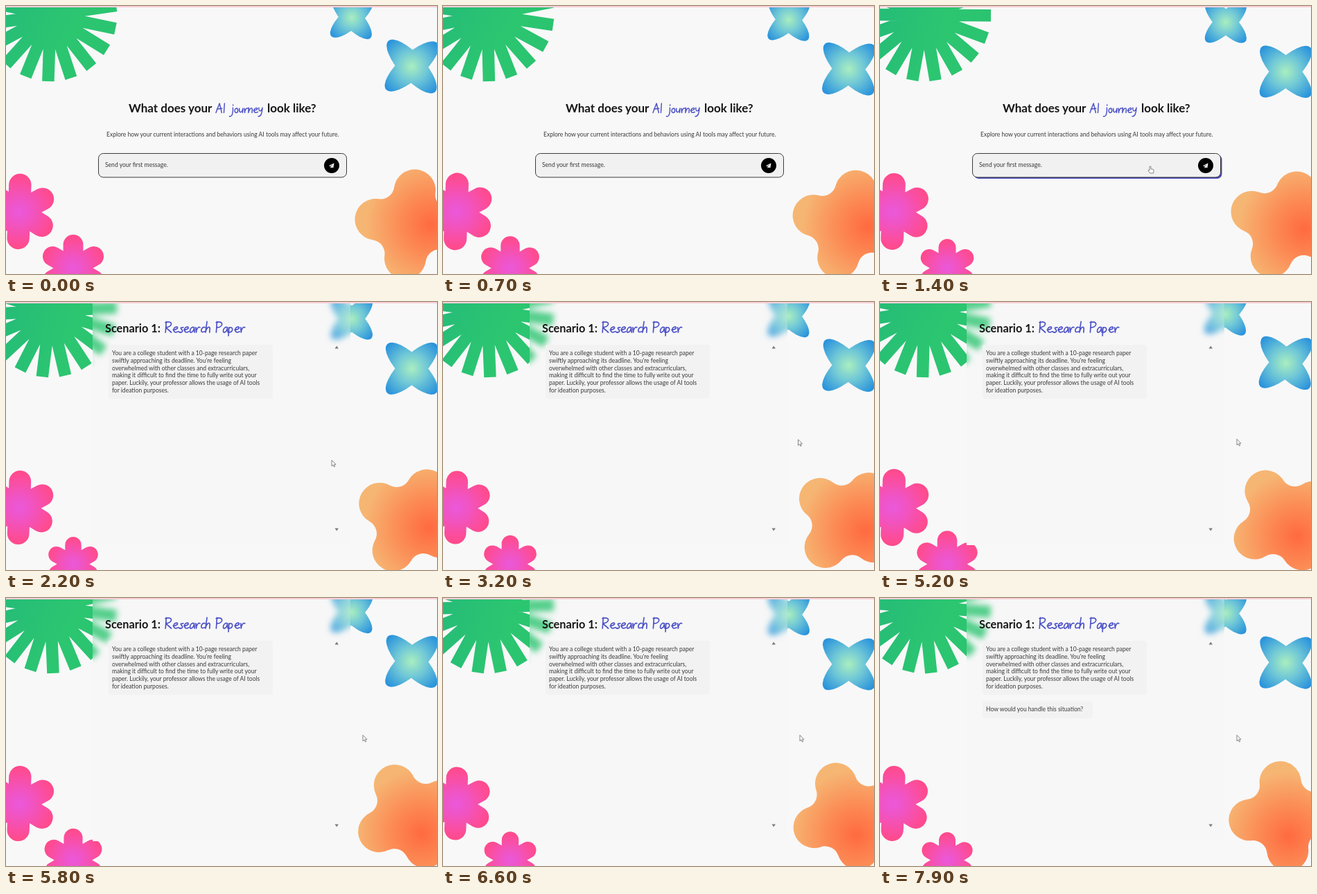
An HTML page for the animation above (8 s loop, 622 px wide and 388 px high).

```html
<!DOCTYPE html>
<html lang="en">
<head>
<meta charset="utf-8">
<title>AI journey</title>
<style>
html, body { margin: 0; width: 100%; height: 100%; overflow: hidden; background: #f8f8f8; }
svg { display: block; width: 622px; height: 388px; }
text { font: 8.55px Lato, "Open Sans", sans-serif; fill: #3a3a3a; }
.title { font-weight: 700; font-size: 17px; fill: #161616; }
.hand { fill: none; stroke: #4c51c6; stroke-width: 1.4; stroke-linecap: round; stroke-linejoin: round; }
</style>
</head>
<body>
<svg viewBox="0 0 622 388">
  <defs>
    <linearGradient id="greenFill" gradientUnits="userSpaceOnUse" x1="-60" y1="0" x2="70" y2="70">
      <stop stop-color="#26bd76"/><stop offset=".6" stop-color="#2cc671"/><stop offset="1" stop-color="#2ac36f"/>
    </linearGradient>
    <radialGradient id="blueFill" gradientUnits="userSpaceOnUse" cx="0" cy="0" r="48">
      <stop stop-color="#a9eebf"/><stop offset=".45" stop-color="#72c9d6"/><stop offset="1" stop-color="#2a93dc"/>
    </radialGradient>
    <radialGradient id="pinkFill" gradientUnits="userSpaceOnUse" cx="0" cy="0" r="50">
      <stop stop-color="#ea58da"/><stop offset=".35" stop-color="#f054c4"/><stop offset="1" stop-color="#ff4b8e"/>
    </radialGradient>
    <radialGradient id="orangeFill" gradientUnits="userSpaceOnUse" cx="30" cy="-4" r="95">
      <stop stop-color="#ff6a40"/><stop offset=".45" stop-color="#fc8a55"/><stop offset="1" stop-color="#f6b673"/>
    </radialGradient>
    <filter id="blur" x="-20%" y="-20%" width="140%" height="140%"><feGaussianBlur stdDeviation="4"/></filter>
    <clipPath id="panelClip"><rect x="125" y="2" width="372" height="350"/></clipPath>
    <g id="star" fill="url(#blueFill)">
      <ellipse rx="50" ry="18" transform="rotate(45)"/><ellipse rx="50" ry="18" transform="rotate(-45)"/>
    </g>
    <path id="flower" d="M0-38V38M-32.9-19L32.9 19M-32.9 19L32.9-19"
      stroke="url(#pinkFill)" stroke-width="32" stroke-linecap="round"/>
  </defs>

  <rect width="622" height="388" fill="#f8f8f8"/>
  <g id="burst"><path id="rays" stroke="url(#greenFill)" stroke-width="17.5"/></g>
  <use id="starTop" href="#star"/>
  <use id="starSide" href="#star"/>
  <use id="flowerA" href="#flower"/>
  <use id="flowerB" href="#flower"/>
  <path id="clover" fill="url(#orangeFill)"/>

  <g id="intro">
    <text class="title" x="177" y="154">What does your</text>
    <g class="hand" data-text="AI journey" data-at="303 154.5 1.04"></g>
    <text class="title" x="377" y="154">look like?</text>
    <text x="145" y="189">Explore how your current interactions and behaviors using AI tools may affect your future.</text>
    <rect id="shadow" x="135.5" y="215.5" width="358" height="34.5" rx="7" fill="#4b48b8"/>
    <rect x="133.5" y="213.5" width="358" height="34.5" rx="7" fill="#f1f1f1" stroke="#3a3a3a"/>
    <text x="143" y="233">Send your first message.</text>
    <circle cx="470" cy="231" r="11" fill="#000"/>
    <path d="M466 231.2L473.5 227.5 472.3 234.6 470 233.4 468.8 235 468.3 232.5 472 229.2 467.5 232Z" fill="#fff"/>
  </g>

  <g id="scenario">
    <g clip-path="url(#panelClip)">
      <rect x="125" width="372" height="352" fill="#f7f7f7"/>
      <g filter="url(#blur)"><use href="#burst"/><use href="#starTop"/></g>
      <rect x="125" width="372" height="352" fill="#f7f7f7" opacity=".2"/>
    </g>
    <text class="title" style="font-size:16.3px" x="143" y="43.5">Scenario 1:</text>
    <g class="hand" data-text="Research Paper" data-at="229 44 1.2"></g>
    <rect x="148" y="62" width="237" height="78" rx="3" fill="#f2f2f2"/>
    <g id="story"></g>
    <g id="question">
      <rect x="148" y="150" width="159" height="24" rx="3" fill="#f2f2f2"/>
      <text x="153" y="163.7">How would you handle this situation?</text>
    </g>
    <path d="M474.5 67.5L477.2 63.5 480 67.5ZM474.5 327.5L477.2 331.5 480 327.5Z" fill="#7b7b7b"/>
  </g>

  <rect width="622" height="2" fill="#f9cfd8"/>
  <g id="cursor" fill="#fff" stroke="#777" stroke-width=".9" stroke-linejoin="round">
    <path id="pointer" d="M0 0V8.6L2 6.8 3.4 9.8 4.8 9.1 3.4 6.2H6Z"/>
    <path id="finger" d="M-1 6V.6Q0-.6 1 .6V4L4 4.4Q5.4 4.8 5.2 6.5L4.5 10H-.3L-3 6.4Q-3 5-1 6Z"/>
  </g>
</svg>
<script>
const $ = id => document.getElementById(id);
const NS = 'http://www.w3.org/2000/svg';
const TAU = Math.PI * 2;

function add(parent, tag, attrs) {
  const el = parent.appendChild(document.createElementNS(NS, tag));
  for (const k in attrs) el.setAttribute(k, attrs[k]);
  return el;
}

// Pen strokes of the handwriting: advance width, path on baseline 0
const glyphs = {
  A: [10, 'M0 0L4-13 8 0M1-5L8-6'],
  I: [5, 'M1-13V0'],
  R: [10, 'M1-13V0M0-12C10-15 9-6 1-6L8 0'],
  P: [9, 'M1-13V0M0-12C10-15 9-5 1-6'],
  a: [7, 'M5-6C0-8-1 1 2 0S5-5 5-6L6 0'],
  c: [6, 'M5-6C1-8-2 2 5-1'],
  e: [7, 'M0-3C8-4 5-8 2-6S1 2 6-1'],
  h: [7, 'M1-13L0 0C1-6 4-8 5-5V0'],
  j: [5, 'M3-7C4 0 3 6-1 5M3-11v1'],
  n: [7, 'M0-7V0C1-6 4-8 5-5V0'],
  o: [7, 'M4-6C0-7 0 0 3 0S6-6 3-6'],
  p: [7, 'M0-6V4M0-5C4-9 7 0 0 0'],
  r: [6, 'M0-6L1 0C1-5 3-7 5-6'],
  s: [6, 'M5-6C-2-6 6-3 4-1Q2 1 0-1'],
  u: [7, 'M0-6C0 1 4 1 5-6V0'],
  y: [7, 'M0-7C0-1 4-1 5-7C5 0 4 6 0 5'],
  ' ': [5, '']
};
for (const g of document.querySelectorAll('.hand')) {
  const { text, at } = g.dataset;
  const [x, y, size] = at.split(' ');
  g.setAttribute('transform', `translate(${x} ${y}) scale(${size}) skewX(-4)`);
  g.setAttribute('role', 'img');
  g.setAttribute('aria-label', text);
  let pen = 0;
  for (const ch of text) {
    const [advance, d] = glyphs[ch];
    add(g, 'path', { d, transform: `translate(${pen})` });
    pen += advance;
  }
}

[
  'You are a college student with a 10-page research paper',
  "swiftly approaching its deadline. You're feeling",
  'overwhelmed with other classes and extracurriculars,',
  'making it difficult to find the time to fully write out your',
  'paper. Luckily, your professor allows the usage of AI tools',
  'for ideation purposes.'
].forEach((line, i) => {
  add($('story'), 'text', { x: 153, y: 77.3 + 10.7 * i }).textContent = line;
});

// Nine diameters make eighteen rays
let rays = '';
for (let i = 0; i < 9; i++) {
  const a = TAU / 4 + i * TAU / 18, x = 96 * Math.cos(a), y = 96 * Math.sin(a);
  rays += `M${-x} ${-y}L${x} ${y}`;
}
$('rays').setAttribute('d', rays);

// Four half-round lobes joined by inward quarter arcs
let clover = '';
for (let i = 0, c = 1, s = 0; i < 4; i++, [c, s] = [-s, c]) {
  const turn = (x, y) => `${x * c - y * s} ${x * s + y * c}`;
  clover += (i ? 'A20 20 0 0 0 ' : 'M') + turn(50, -30) + 'A30 30 0 0 1 ' + turn(50, 30);
}
$('clover').setAttribute('d', clover + 'A20 20 0 0 0 50 -30Z');

// Cursor stops: time, x, y
const path = [
  [0.7, 430, 392], [1.3, 390, 232], [1.5, 390, 232], [1.95, 470, 229],
  [2.3, 470, 229], [2.8, 512.5, 199], [3.4, 512.5, 199], [3.7, 515, 198.5]
];
const smooth = k => k * k * (3 - 2 * k);

function cursorAt(t) {
  const i = path.findIndex(p => p[0] > t);
  if (i < 0) return path[path.length - 1].slice(1);
  if (i === 0) return path[0].slice(1);
  const [a, b] = [path[i - 1], path[i]];
  const k = smooth((t - a[0]) / (b[0] - a[0]));
  return [a[1] + (b[1] - a[1]) * k, a[2] + (b[2] - a[2]) * k];
}

const place = (id, x, y, rest = '') => $(id).setAttribute('transform', `translate(${x} ${y}) ${rest}`);
const show = (id, on) => $(id).setAttribute('visibility', on ? 'inherit' : 'hidden');
const SWITCH = 2.2, ASK = 7.3;

function draw(now) {
  const t = now % 8000 / 1000;
  const drift = 0.5 - 0.5 * Math.cos(TAU * (t / 5 + 0.1));
  const tilt = `rotate(${3 * (1 - drift)})`;

  place('burst', 64, 13, `rotate(${2 - 15.5 * drift * drift})`);
  place('starTop', 499, 16 + 8.5 * drift, tilt + 'scale(.8)');
  place('starSide', 585.5, 86.5 + 10 * drift, tilt);
  place('flowerA', 19, 297.5, `rotate(2) scale(${1.007 + 0.03 * Math.sin(TAU * t / 4 + 0.2)})`);
  place('flowerB', 97, 379.5, `scale(${0.815 + 0.086 * Math.cos(TAU * (t / 5 + 0.03))})`);
  place('clover', 583, 316, `rotate(${8 + 9.6 * t})`);

  const [x, y] = cursorAt(t);
  const intro = t < SWITCH, hover = intro && y < 249;
  place('cursor', x, y);
  show('cursor', t > 0.7);
  show('finger', hover && t > 0.7);
  show('pointer', !hover && t > 0.7);
  $('intro').style.display = intro ? '' : 'none';
  $('scenario').style.display = intro ? 'none' : '';
  show('shadow', hover);
  show('question', t >= ASK);
  requestAnimationFrame(draw);
}
draw(performance.now());
</script>
</body>
</html>
```
